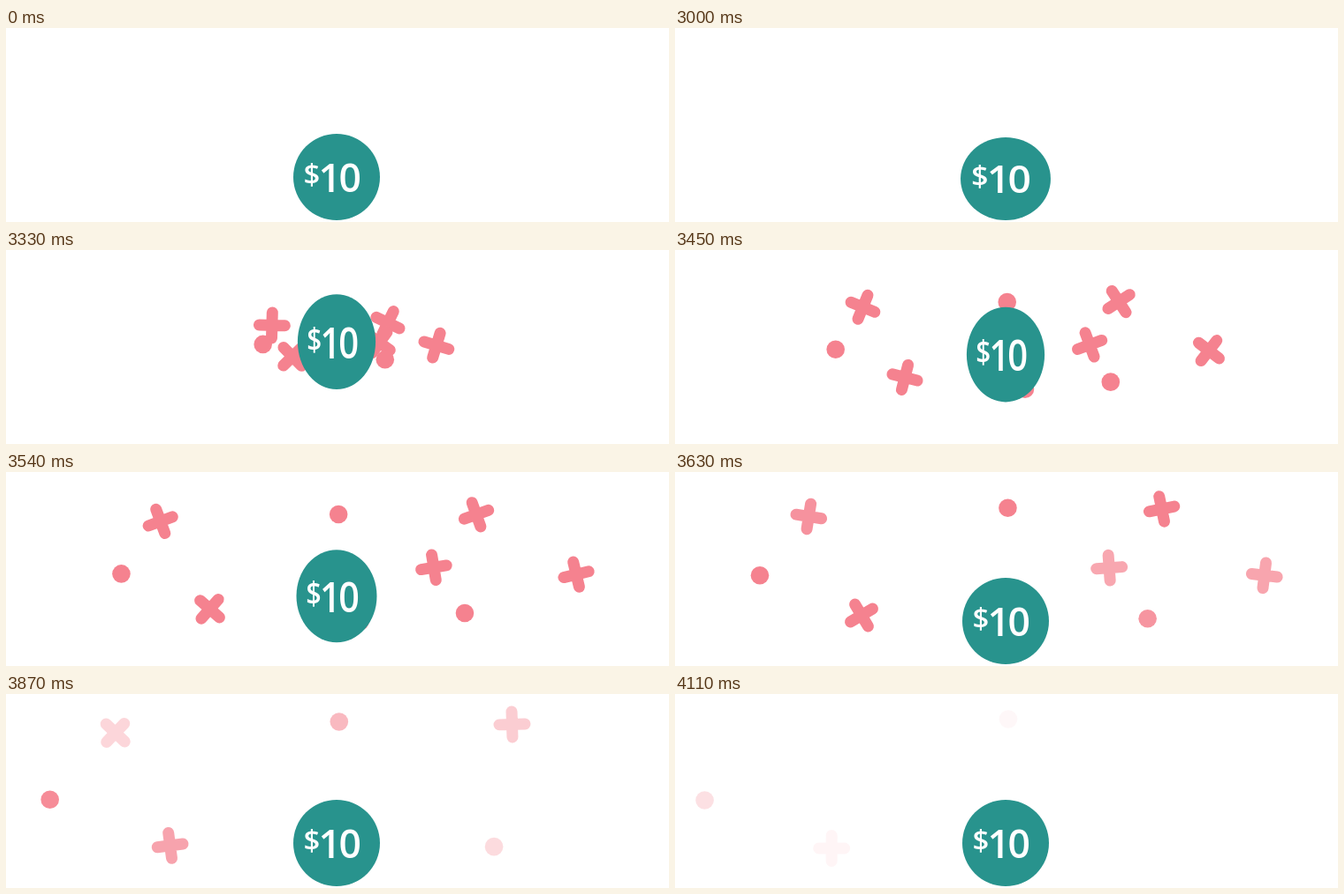
An HTML page with a canvas that plays this animation: 750x220 px, repeating every 4.14 s.

```html
<!DOCTYPE html>
<html lang="en">
<head>
<meta charset="utf-8">
<title>$10 burst</title>
<style>
  html, body { margin: 0; overflow: hidden; background: #fff; }
  canvas { display: block; }
</style>
</head>
<body>
<canvas id="stage" width="750" height="220"></canvas>
<script>
const ctx = document.getElementById('stage').getContext('2d');
const LOOP = 4140, STEP = 30;
const TEAL = '#28938d', PINK = '#f5828f';
const FLOOR = 218, RADIUS = 49, JUMP = 61.6;
const ORIGIN = { x: 374, y: 102.5 }, BURST = 3268;

// dx, dy: final offset; rate: decay per ms; spin: total degrees (0 = dot); fade: start and end
const particles = [
  { dx: -261, dy: -61, rate: .0053, spin: 327, fade: [3570, 4015] },
  { dx: -349, dy: 18.5, rate: .0044, spin: 0, fade: [3840, 4200] },
  { dx: -201, dy: 74, rate: .0046, spin: 184, fade: [3770, 4140] },
  { dx: 3, dy: -75.5, rate: .0047, spin: 0, fade: [3660, 4140] },
  { dx: 207, dy: -71, rate: .0053, spin: 92, fade: [3630, 4030] },
  { dx: 124, dy: 6.5, rate: .008, spin: 91, fade: [3565, 3783] },
  { dx: 317, dy: 16, rate: .0071, spin: 300, fade: [3558, 3814] },
  { dx: 184, dy: 73, rate: .0057, spin: 0, fade: [3566, 3995] },
  { dx: 33, dy: 83, rate: .006, spin: 0, fade: [3570, 3960] }
];

const progress = (t, from, to) => Math.min(1, Math.max(0, (t - from) / (to - from)));

function drawParticle(p, t) {
  const travel = 1 - Math.exp(-p.rate * (t - BURST));
  ctx.save();
  ctx.globalAlpha = 1 - progress(t, ...p.fade);
  ctx.translate(ORIGIN.x + p.dx * travel, ORIGIN.y + p.dy * travel);
  ctx.rotate(p.spin * travel * Math.PI / 180);
  ctx.beginPath();
  if (p.spin) {
    ctx.moveTo(-14.5, 0);
    ctx.lineTo(14.5, 0);
    ctx.moveTo(0, -14.5);
    ctx.lineTo(0, 14.5);
    ctx.lineWidth = 13;
    ctx.lineCap = 'round';
    ctx.strokeStyle = PINK;
    ctx.stroke();
  } else {
    ctx.arc(0, 0, 10.3, 0, 2 * Math.PI);
    ctx.fillStyle = PINK;
    ctx.fill();
  }
  ctx.restore();
}

function label(text, x, y, size, spacing) {
  ctx.font = `600 ${size}px "Open Sans", sans-serif`;
  ctx.letterSpacing = spacing;
  ctx.fillText(text, x, y);
}

function drawBall(t) {
  // Squash, stretch in flight, then settle; the ball scales about its base.
  const stretch = -.1 * progress(t, 2970, 3045)
    + .2 * progress(t, 3045, 3150)
    - .1 * progress(t, 3510, 3615);
  const rise = 1 - (1 - progress(t, 3045, 3275)) ** 2;
  const fall = progress(t, 3275, 3618) ** 2;
  ctx.save();
  ctx.translate(ORIGIN.x, FLOOR - JUMP * (rise - fall));
  ctx.scale(1 - stretch, 1 + stretch);
  ctx.fillStyle = TEAL;
  ctx.beginPath();
  ctx.arc(0, -RADIUS, RADIUS, 0, 2 * Math.PI);
  ctx.fill();
  ctx.fillStyle = '#fff';
  label('$', -37.5, -40, 33, '0px');
  label('10', -20.5, -32, 44.5, '-2.5px');
  ctx.restore();
}

function draw(now) {
  const t = Math.floor(now % LOOP / STEP) * STEP;
  ctx.clearRect(0, 0, 750, 220);
  if (t >= BURST) particles.forEach(p => drawParticle(p, t));
  drawBall(t);
  requestAnimationFrame(draw);
}
requestAnimationFrame(draw);
</script>
</body>
</html>
```
